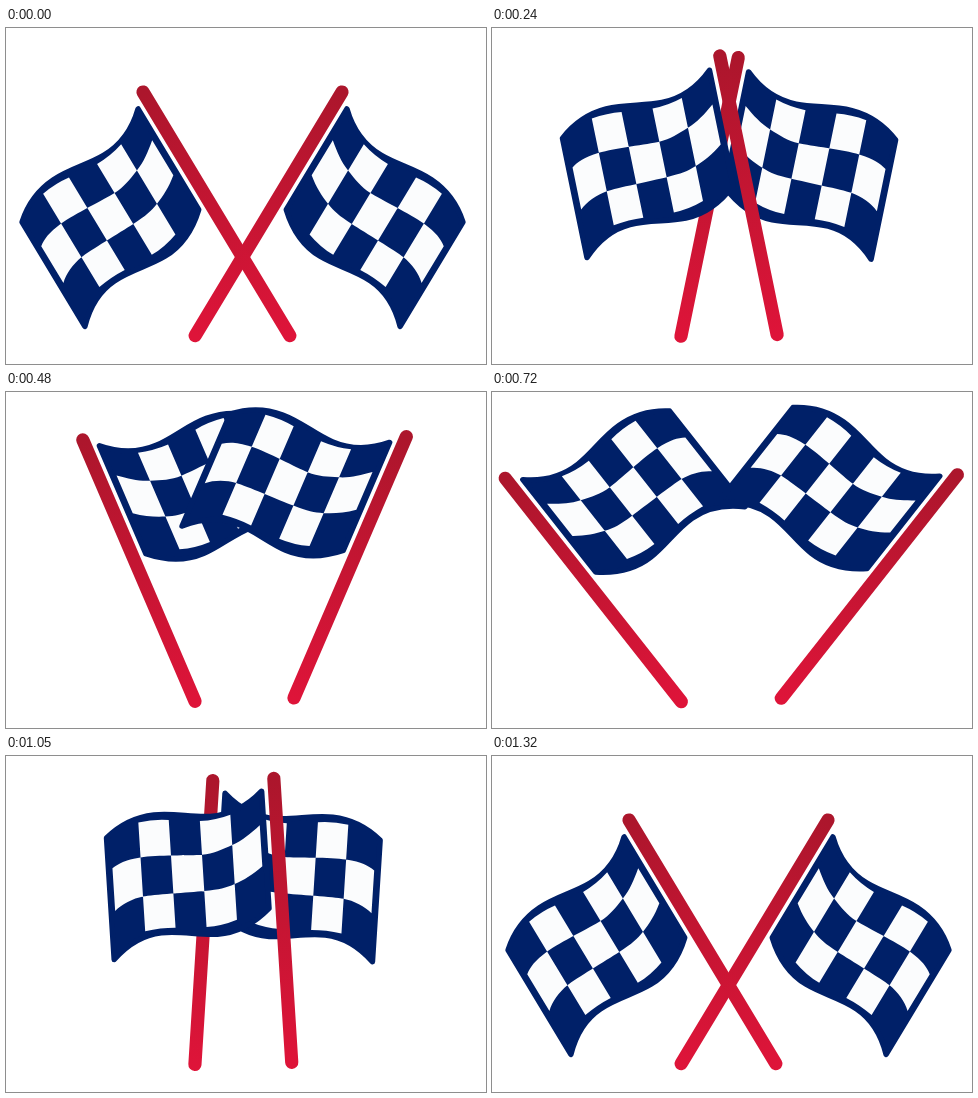
Recreate the animation shown at these times as an HTML page without scripts. Size 480 px wide and 336 px high, loop 1.47 s.

```html
<!DOCTYPE html>
<html lang="en">
<head>
<meta charset="utf-8">
<title>Crossed racing flags</title>
<style>
  @property --tick {
    syntax: "<number>";
    inherits: true;
    initial-value: 0;
  }

  html, body {
    margin: 0;
    width: 100%;
    height: 100%;
    overflow: hidden;
    background: #fff;
  }

  svg {
    display: block;
    width: 100vw;
    height: 100vh;
    animation: tick 1470ms steps(49) -1ms infinite;
  }

  @keyframes tick {
    from { --tick: 0; }
    to { --tick: 49; }
  }

  /* Swing out for 23 ticks, back for 21, then rest; smoothstep both ways. */
  .swing {
    --u: max(0, min(var(--tick) / 23, (44 - var(--tick)) / 21));
    --turn: calc(var(--u) * var(--u) * (3 - 2 * var(--u)) * 69.77deg);
  }

  .back {
    transform-origin: 190.7px 308.6px;
    transform: rotate(calc(-1 * var(--turn)));
  }

  .front {
    transform-origin: 287.6px 310.9px;
    transform: rotate(var(--turn));
  }

  .cloth {
    fill: #002068;
    stroke: #002068;
    stroke-width: 5.5;
    stroke-linejoin: round;
  }

  .checks {
    fill: #fbfcfd;
    fill-rule: evenodd;
  }

  .pole {
    stroke: url(#red);
    stroke-width: 13.2;
    stroke-linecap: round;
  }
</style>
</head>
<body>
<svg viewBox="0 0 480 336">
  <defs>
    <linearGradient id="red" gradientUnits="userSpaceOnUse" x1="0" y1="0" x2="0" y2="285">
      <stop offset="0" stop-color="#ac162c"/>
      <stop offset="1" stop-color="#de1439"/>
    </linearGradient>

    <!-- Upright flag with the pole tip at the origin -->
    <g id="flag">
      <path class="cloth" d="M13 12C28 26 45 34 66 34C85 34 102 28 122 29C142 30 158 38 170.7 49
        V170.7C158 158 142 148 122 147C102 146 85 152 66 152C45 152 28 143 13 129.5Z"/>
      <!-- Two columns and the middle row cancel out where they cross -->
      <path class="checks" d="M45.7 33.5Q60 38 76.5 38V144Q61 144 45.7 138.7Z
        M107.5 35Q122 33 138 35.5V144.5Q122 142 107.5 143Z
        M17 46C27 54 35 60 45.7 64S65 71.5 76.5 71.8S122 69 138 70.5S160 75 166.7 79.5
        V122.5C160 116 148 111 138 109.7S92 108.5 76.5 108S55 106.5 45.7 103S27 95 17 87Z"/>
      <path class="pole" d="M0 0V284.5"/>
    </g>
  </defs>

  <g class="swing back">
    <use href="#flag" transform="translate(336 64) rotate(31.07)"/>
  </g>
  <g class="swing front">
    <use href="#flag" transform="translate(137 64) rotate(-31.07) scale(-1 1)"/>
  </g>
</svg>
</body>
</html>
```
